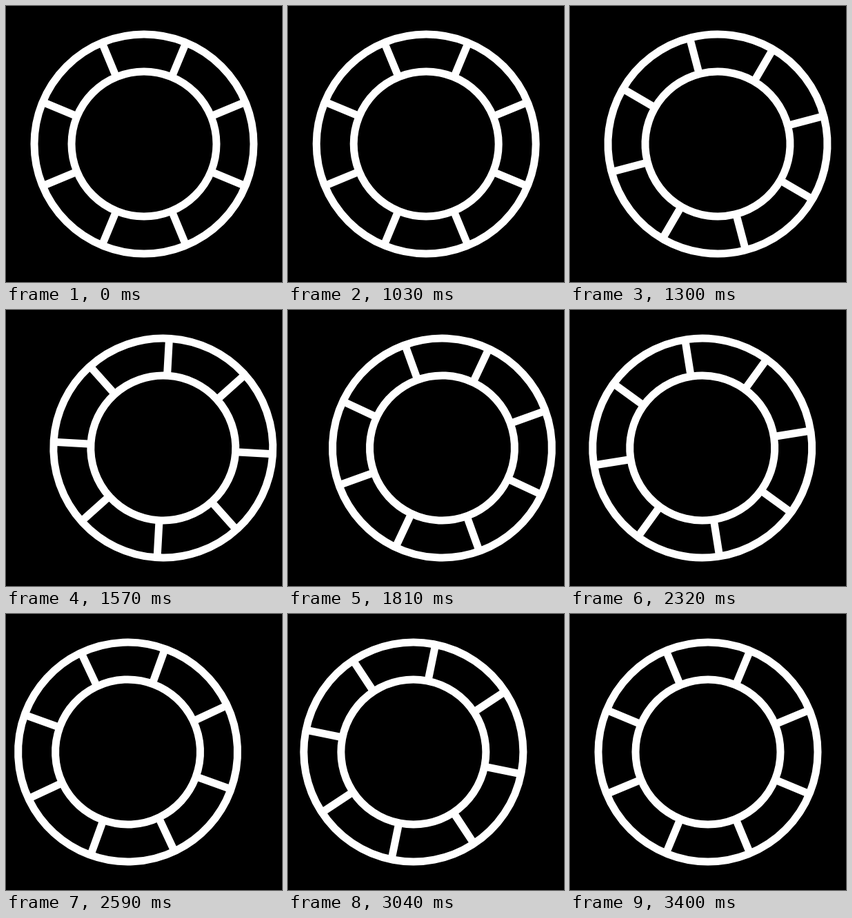
An HTML page for the animation above (3.43 s loop, 400x400 px).

```html
<!DOCTYPE html>
<html lang="en">
<head>
<meta charset="utf-8">
<title>Rolling wheel</title>
<style>
  html, body { margin: 0; width: 100%; height: 100%; overflow: hidden; background: #000; }
  svg { display: block; width: 100vw; height: 100vh; }
</style>
</head>
<body>
<svg viewBox="0 0 400 400">
  <g id="wheel" fill="none" stroke="#fff" stroke-width="11">
    <circle r="159"/>
    <circle r="105"/>
    <path id="spokes"/>
  </g>
</svg>
<script>
  const LOOP = 3430, HOLD = 1000, STEP = 30, STEPS = 80, SWING = 28;
  const wheel = document.getElementById('wheel');

  let spokes = '';
  for (let i = 0; i < 8; i++) {
    const a = (i + 0.5) * Math.PI / 4, c = Math.cos(a), s = Math.sin(a);
    spokes += `M${105 * c} ${105 * s}L${159 * c} ${159 * s}`;
  }
  document.getElementById('spokes').setAttribute('d', spokes);

  const ease = u => u * u * (3 - 2 * u);

  // Right, across to the left, and back to the centre
  function offset(p) {
    if (p < 0.25) return SWING * ease(p * 4);
    if (p < 0.75) return SWING * (1 - 2 * ease((p - 0.25) * 2));
    return SWING * (ease((p - 0.75) * 4) - 1);
  }

  function draw(now) {
    const step = Math.floor((now % LOOP - HOLD) / STEP);
    const p = Math.min(Math.max(step, 0), STEPS) / STEPS;
    wheel.setAttribute('transform', `translate(${200 + offset(p)} 200) rotate(${180 * ease(p)})`);
  }

  const start = performance.now();
  function tick() {
    draw(performance.now() - start);
    requestAnimationFrame(tick);
  }
  tick();
</script>
</body>
</html>
```
